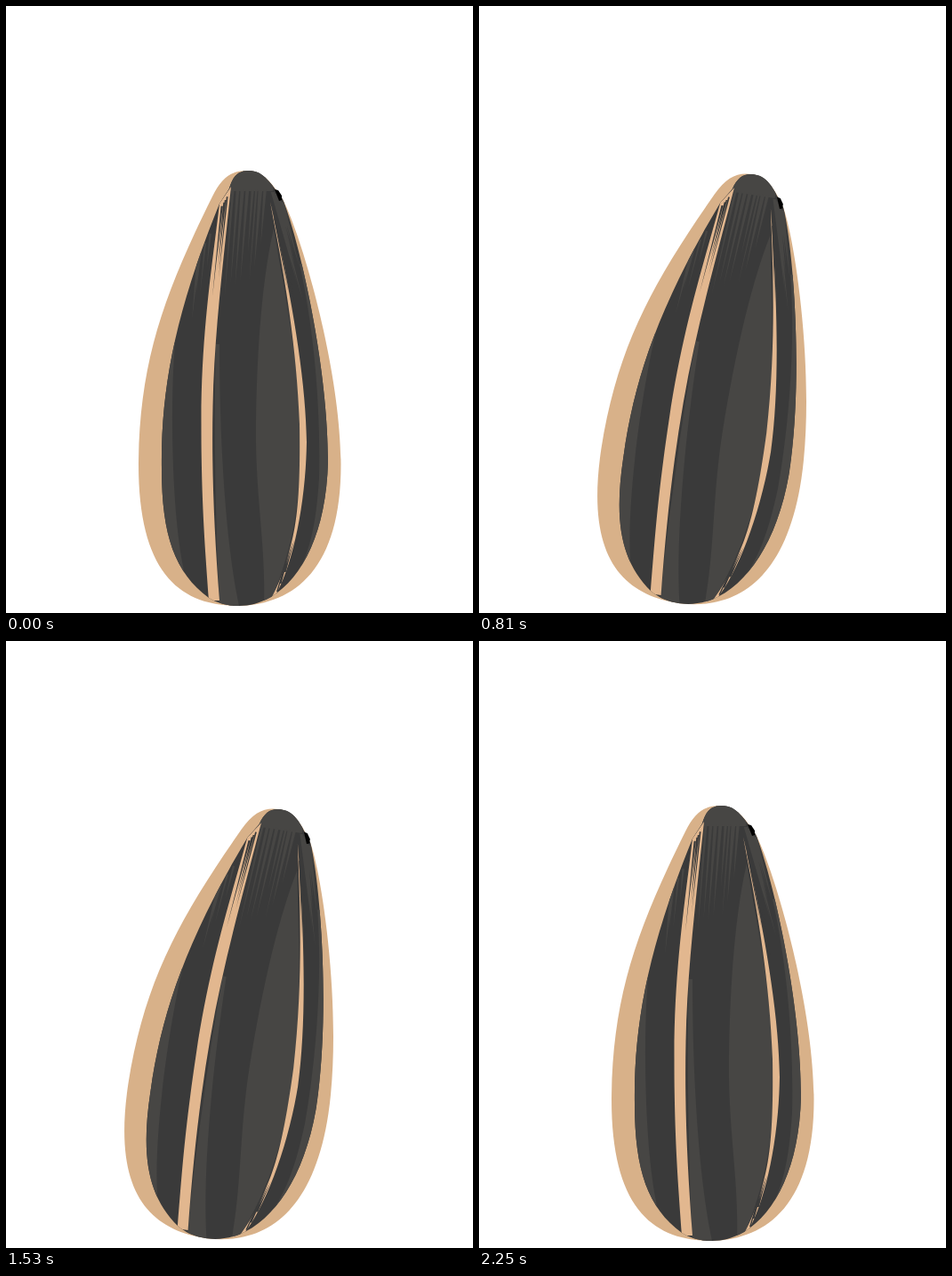
These frames come from a looping animation (525x682 px, 2.34 s). An HTML page:

```html
<!DOCTYPE html>
<html lang="en">
<head>
<meta charset="utf-8">
<title>Rocking seed</title>
<style>
  html, body { margin: 0; width: 100%; height: 100%; overflow: hidden; background: #fff; }
  svg { display: block; width: 525px; height: 682px; }
  .husk { fill: #d8b189; }
  .shell { fill: #3a3a3a; }
  .sheen { fill: #474644; }
  .stripe { fill: #e2b78f; }
</style>
</head>
<body>
<svg viewBox="0 0 525 682">
  <defs>
    <path id="shell" d="M251 205C255 190 262 185 273 185C290 185 298 200 311 217C328 258 362 400 362 512C360 590 334 642 298 664C285 671 274 674 262 674C248 674 238 671 228 665C190 637 175 595 175 520C174 430 190 345 240 222Z"/>
    <clipPath id="inside"><use href="#shell"/></clipPath>
  </defs>
  <g id="seed">
    <path class="husk" d="M262 674C196 674 149 638 149 515C150 400 177 325 232 214C243 192 254 185 271 185C290 185 300 201 311 217C331 255 376 405 376.5 515C376.5 632 325 672 262 674Z"/>
    <use href="#shell" class="shell"/>
    <g clip-path="url(#inside)">
      <g class="sheen">
        <path d="M190 378C184 450 186 590 204 650H150V378Z"/>
        <path d="M236 380C233 460 236 600 240 674H262C248 610 240 500 240 380Z"/>
        <path d="M301 250C287 310 281 400 281 490C282 560 292 610 290 672L299 665C322 610 331 560 331 490C331 400 312 320 301 250Z"/>
        <path d="M330 290C346 360 354 450 352 530C349 580 342 610 330 634H380V290Z"/>
        <path d="M248 180H300V208H250Z"/>
      </g>
      <g class="sheen" id="grain"></g>
      <g class="stripe">
        <path d="M253 203L240 222C232 290 219 370 219.5 470C219.5 560 224 610 228 668H240C234 590 231 520 232.5 450C234 370 244 290 253 203Z"/>
        <path d="M297 220C305 265 326 360 330 470C331 540 328 580 319 610C313 635 306 650 298 666L302 664C322 630 337 560 338 490C337 420 322 330 297 220Z"/>
      </g>
      <g class="shell" id="slits"></g>
    </g>
    <path d="M302 206L306 207L310 213V218L307 219Z"/>
  </g>
</svg>
<script>
const STEP = 90;
const COUNT = 26;
// Turning points [step, degrees]; the second half of the loop runs back.
const SWING = [[0, 0], [1, 0], [4, -7.2], [5, -11.2], [7, 0], [11, 17.2], [13, 10.8]];
const seed = document.getElementById('seed');

let state = 7;
function random() {
  state = state * 16807 % 2147483647;
  return state / 2147483647;
}

const mix = (a, b, u) => a + (b - a) * u;

// Fan of tapered streaks, from the line between a and b along (dx, dy)
function streaks(id, count, a, b, dx, dy, width) {
  let d = '';
  for (let i = 0; i < count; i++) {
    const u = (i + random()) / count;
    const x = mix(a[0], b[0], u), y = mix(a[1], b[1], u);
    const reach = mix(0.5, 1.2, random());
    const half = width * mix(0.3, 0.6, random());
    d += `M${x - half} ${y}L${x + dx * reach} ${y + dy * reach}L${x + half} ${y}Z`;
  }
  const path = document.createElementNS('http://www.w3.org/2000/svg', 'path');
  path.setAttribute('d', d);
  document.getElementById(id).append(path);
}

streaks('grain', 8, [255, 206], [292, 206], -8, 105, 4);
streaks('grain', 5, [297, 206], [312, 222], 28, 105, 4);
streaks('grain', 4, [214, 285], [230, 255], -7, 70, 3);
streaks('slits', 4, [242, 226], [250, 212], -11, 105, 1.8);
streaks('slits', 4, [301, 235], [318, 300], 14, 75, 2);
streaks('slits', 3, [304, 660], [314, 635], 18, -62, 2);

function tilt(step) {
  const i = Math.max(1, SWING.findIndex(([s]) => s >= step));
  const [s0, a0] = SWING[i - 1], [s1, a1] = SWING[i];
  return mix(a0, a1, (step - s0) / (s1 - s0));
}

const start = performance.now();
function tick() {
  const step = Math.floor((performance.now() - start) / STEP) % COUNT;
  const angle = tilt(Math.min(step, COUNT - step));
  seed.setAttribute('transform', `rotate(${angle} 262.5 429.5)`);
  requestAnimationFrame(tick);
}
tick();
</script>
</body>
</html>
```
